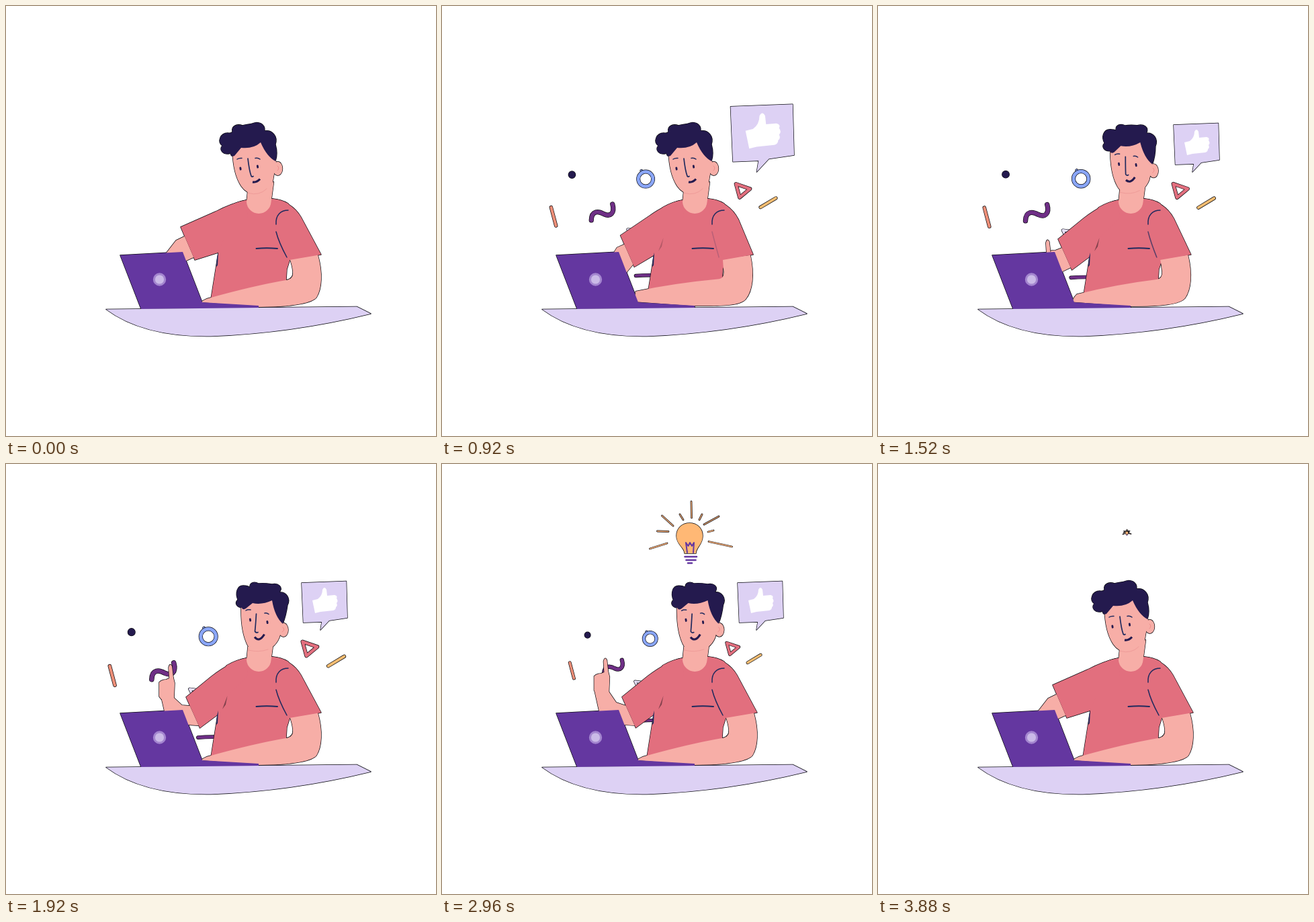
An HTML page with a canvas that plays this animation: 640x640 px, repeating every 3.92 s.

```html
<!DOCTYPE html>
<html lang="en">
<head>
<meta charset="utf-8">
<title>Bright idea at the desk</title>
<style>
  html, body { margin: 0; width: 100%; height: 100%; overflow: hidden; background: #fff; }
  canvas { display: block; width: 640px; height: 640px; }
</style>
</head>
<body>
<canvas id="stage" width="640" height="640"></canvas>
<script>
const ctx = document.getElementById('stage').getContext('2d');
const LOOP = 3920, STEP = 40;
const NAVY = '#241a4e', INK = '#202a5e', SKIN = '#f7aea7', SHIRT = '#e26f7e';
const PURPLE = '#6437a0', LILAC = '#ddd1f4', ORANGE = '#ffb875', EDGE = '#0a0a10';
const EDGE_WIDTH = 1.4;
let zoom = 1;

const clamp = x => Math.min(1, Math.max(0, x));
const smooth = x => { x = clamp(x); return x * x * (3 - 2 * x); };
const lerp = (a, b, u) => a + (b - a) * u;

// Blends two SVG paths that share the same commands.
function morph(a, b, u) {
  const target = b.match(/-?[\d.]+/g);
  let i = 0;
  return a.replace(/-?[\d.]+/g, n => lerp(+n, +target[i++], u).toFixed(2));
}

// Keyframes [time, ...values], joined by curves that rest at every extreme.
function track(keys) {
  const slope = (i, c) => {
    const p = keys[i - 1], k = keys[i], n = keys[i + 1];
    if (!p || !n || (k[c] - p[c]) * (n[c] - k[c]) <= 0) return 0;
    const s1 = (k[c] - p[c]) / (k[0] - p[0]), s2 = (n[c] - k[c]) / (n[0] - k[0]);
    return 2 * s1 * s2 / (s1 + s2);
  };
  return t => {
    const last = keys.length - 1;
    if (t <= keys[0][0]) return keys[0].slice(1);
    if (t >= keys[last][0]) return keys[last].slice(1);
    const i = keys.findIndex(k => k[0] > t) - 1;
    const a = keys[i], b = keys[i + 1], d = b[0] - a[0], u = (t - a[0]) / d;
    return a.slice(1).map((v, j) => {
      const c = j + 1;
      return lerp(v, b[c], smooth(u)) + d * u * (1 - u) *
        ((1 - u) * slope(i, c) - u * slope(i + 1, c));
    });
  };
}

const headTurn = track([[1080, 0], [1800, 1], [2880, 1], [3660, 0]]);
const sleeveDrop = track([[350, 0], [1250, 1], [2900, 1], [3800, 0]]);
const restShift = track([[100, 0], [1200, 1], [1800, 0]]);
const burst = track([[80, 0], [590, 1.02], [1180, 0.84], [1760, 0.99],
  [2240, 0.85], [2780, 0.99], [3380, 0]]);
// Inner elbow, right wrist, left wrist, outer elbow.
const forearm = track([
  [0, 253, 349, 239, 367, 215, 395, 262, 382],
  [640, 255, 352, 246, 366, 222, 395, 264, 389],
  [1200, 265, 366, 262, 370, 255, 405, 276, 412],
  [1920, 262, 359, 250, 348, 231, 347, 240, 386],
  [2400, 260, 356, 246, 320, 224, 321, 236, 386],
  [2700, 260, 356, 246, 320, 224, 321, 236, 386],
  [3360, 257, 352, 253, 375, 232, 375, 245, 386],
  [3840, 253, 349, 239, 367, 215, 395, 262, 382]
]);
// How far the pointing hand is tucked behind the screen.
const handTuck = track([[1200, 75], [1800, 0], [3360, 0], [3760, 75]]);

// Grows past full size, then settles.
function pop(t, start) {
  const e = t - start;
  if (e < 360) return 1.44 * smooth(e / 360);
  return 1 + 0.44 * (1 - Math.pow(clamp((e - 360) / 230), 1.5));
}
const shrink = (t, end) => clamp((end - t) / 400);

function fill(path, color) {
  ctx.fillStyle = color;
  ctx.fill(new Path2D(path));
}
function line(path, color, width) {
  ctx.strokeStyle = color;
  ctx.lineWidth = width;
  ctx.stroke(new Path2D(path));
}
function edge(path, width = 0) {
  line(path, EDGE, width + EDGE_WIDTH / zoom);
}
function shape(path, color) {
  edge(path);
  fill(path, color);
}
function tube(path, color, width) {
  edge(path, width);
  line(path, color, width);
}
// Outlines a whole set first so only its joint silhouette shows an edge.
function group(parts) {
  parts.forEach(p => edge(p[0]));
  parts.forEach(p => fill(...p));
}
const disc = (x, y, rx, ry = rx) =>
  `M${x - rx} ${y} a${rx} ${ry} 0 1 0 ${2 * rx} 0 a${rx} ${ry} 0 1 0 ${-2 * rx} 0 Z`;

function scaled(x, y, s, draw) {
  if (s < 0.012) return;
  ctx.save();
  ctx.translate(x, y);
  ctx.scale(s, s);
  ctx.translate(-x, -y);
  zoom = s;
  draw();
  zoom = 1;
  ctx.restore();
}

function confetti() {
  const ring = disc(299, 256, 12);
  shape(disc(179, 249, 5.6), NAVY);
  tube('M292 242.500 L294 246', '#8aa6f8', 3.5);
  tube(ring, '#8aa6f8', 5);
  tube('M446 264 L469 272 L452 286 Z', SHIRT, 4.6);
  tube('M486 302 L511 287', '#f3bd72', 4.2);
  tube('M145 302 L153 332', '#ee8f78', 4.4);
  tube('M210.500 323 C211 307 222 308 231 313 C242 318 249 311 245 297', '#6f2f86', 6.4);
  tube('M283 413.500 Q300 412 325 413', '#6f2f86', 4.6);
  tube('M270 338 L294 341 L279 356 Z', '#e6dff7', 3.6);
}

function bubble() {
  shape('M440 177 L506.500 174.500 L508 229 L481 233 L468 247 L470 235 L442.500 236 Z', LILAC);
  fill('M456 203 L464 201 Q471 196 471 187 Q474 181 477 187 L478 196 L489 195 ' +
    'Q494 196 492 200 Q495 204 492 207 Q494 211 491 213 Q491 217 487 218 L468 220 L460 222 Z', '#fff');
}

function bulb() {
  ['M371 56 L371.500 80', 'M327.500 77 L344 92', 'M354 75 L359 83', 'M387 75 L383 83',
    'M412 78 L390 90', 'M320.500 100 L337 100.500', 'M309.500 126 L335 118',
    'M396 101 L404 99', 'M397 115.500 L431.500 123'].forEach(r => tube(r, '#f9b078', 1.4));
  shape('M361 133 C361 124 349 120 349 107 C349 95 358 88 368.500 88 ' +
    'C379 88 388 95 388 107 C388 120 378 124 378 133 Z', ORANGE);
  line('M365 132 L363 117 L366.500 122 L369 117 L372 122 L375 117 L374 132', PURPLE, 2);
  line('M361.500 138 L379 138 M363.500 143 L377.500 143 M366 147.500 L372 147.500', PURPLE, 2.6);
}

function bodyParts(t) {
  const [drop] = sleeveDrop(t), [shift] = restShift(t), [tuck] = handTuck(t);
  const [ix, iy, rx, ry, lx, ly, ox, oy] = forearm(t);
  const c1 = [lerp(260, 268, drop), lerp(329, 347, drop)];
  const c2 = [lerp(281, 288.5, drop), lerp(378, 393, drop)];
  const cuff = u => `${lerp(c1[0], c2[0], u)} ${lerp(c1[1], c2[1], u)}`;
  const lower = `M${cuff(0.28)} L${ix} ${iy} L${rx} ${ry} L${lx} ${ly} L${ox} ${oy} L${cuff(0.92)} Z`;
  const fist = `M${rx - 19} ${ry + tuck + 2} l-3 -4 l0 -21 q4 -4 10 -4 l5 -2 l-1 -16 q2 -8 5 -2 l2 17 l2 8 l-1 24 Z`;
  const sleeve = `M357 289 Q335 294 ${lerp(312, 306, drop)} ${lerp(306, 316, drop)} L${cuff(0)} L${cuff(1)} ` +
    `L${lerp(316, 318, drop)} ${lerp(367, 371, drop)} L${lerp(325, 330, drop)} 345 L360 315 Z`;
  const torso = 'M358 289 C345 291 335 296 328 300 L318 325 L316 367 L305 436 L417 436 ' +
    'L417 408 L418 392 L423 376 L442 330 L420 294 Q410 288 396 287 Z';
  const farSleeve = morph(
    'M396 287 Q425 291 439 314 L469 370 L422 378 L402 338 Z',
    'M396 287 Q428 291 442 319 L462 370 L417 378 L402 338 Z', shift);
  const restArm = morph(
    'M464 370 C472 398 470 421 462 434 C455 442 430 446 400 447.5 L376 448 L291 441 ' +
    'Q293 437 305 434 Q370 416 417 408 Q428 406 427 396 Q426 385 422 376 Z',
    'M458 371 C464 400 461 425 450 437 C443 445 425 446 400 446 L370 446 L288 440 ' +
    'Q285 434 285 423 Q340 412 412 406 Q418 405 418 396 Q417 385 417 376 Z', shift);
  return [[lower, SKIN], [fist, SKIN], [torso, SHIRT], [sleeve, SHIRT], [restArm, SKIN], [farSleeve, SHIRT]];
}

function bodyLines(t) {
  const [drop] = sleeveDrop(t), [shift] = restShift(t);
  fill('M316 367 L315 386 L313 388 L314 374 Z', INK);
  ctx.globalAlpha = drop * drop;
  fill('M329.500 345 L327 358 L322 365 Z', '#80404c');
  ctx.globalAlpha = 1;
  line('M402 325 C401 311 409 304 420 304', INK, 1.5);
  line('M372.500 361 Q388 359.500 404 361', INK, 1.9);
  ctx.globalAlpha = clamp(1.3 * (1 - shift));
  line(`M402 336 Q406 352 ${lerp(418, 411, shift)} 374`, INK, 1.5);
  ctx.globalAlpha = 1;
}

function headParts(t) {
  const [turn] = headTurn(t);
  const neck = 'M360 272 L358 292 A18.300 18.300 0 0 0 394.500 292 L398.500 262 Z';
  const ear = disc(lerp(404.5, 413, turn), lerp(242, 247, turn), 7, 10.2);
  const face = morph(
    'M337 215 Q338 250 350 268 Q358 280 372 280 Q390 280 397 262 L402 232 L390 195 L350 200 Z',
    'M350 210 Q349 244 357 264 Q362 279 376 279 Q399 278 407 258 L413 236 L400 195 L360 200 Z', turn);
  const hair = morph(
    'M322 208 C314 202 319 189 330 189 Q336 190 337 187 C335 178 345 175 352 178 ' +
    'C358 176 365 176 367 175 C375 171 386 175 385 186 C396 184 405 194 401 206 Q405 220 401 231 ' +
    'Q388 224 379 203 Q368 213 350 211 L340 223 Q335 225 334 219 C324 223 316 214 322 208 Z',
    'M345 202 C341 192 344 181 353 181 Q360 181 363 184 C362 177 369 174 376 178 ' +
    'C383 177 390 178 396 179 C405 177 413 183 407 191 C417 190 424 200 419 210 Q417 225 412 238 ' +
    'Q400 227 396 203 Q381 210 367 207 L357 215 Q352 218 351 214 C343 213 340 207 345 202 Z', turn);
  return [[neck, SKIN], [ear, SKIN], [face, SKIN], [hair, NAVY]];
}

function headLines(t) {
  const [turn] = headTurn(t);
  const stroke = (a, b, color, width) => line(morph(a, b, turn), color, width);
  const closed = t >= 2480 && t < 2640;
  stroke('M404 238 Q408 241 404 245', 'M412 243 Q416 247 411 250', '#ee8d8d', 1);
  stroke('M361 278.5 Q377 283 388 272', 'M361 277 Q376 281 390 276', '#ef9c99', 1);
  const eyes = [[349, 242, 363.5, 232], [374.5, 239, 389, 235.5]];
  for (const [x1, y1, x2, y2] of eyes) {
    const x = lerp(x1, x2, turn), y = lerp(y1, y2, turn);
    if (closed) line(`M${x - 1.5} ${y} l3 0`, '#9d6673', 1);
    else line(`M${x - 0.2} ${y - 1.2} l0.4 2.4`, NAVY, 2.8);
  }
  stroke('M344 228 Q347 226 351 226.5 M371 226.5 Q375 225.5 378 228',
    'M357 218 Q360 216 364 217 M385 222 Q388 221 391 223.5', INK, 1.5);
  stroke('M360 227 Q362 245 365 253 Q366 255 368 253.5',
    'M372.5 223 Q371.5 240 370.5 249 Q372 252 375 250.5', INK, 1.7);
  ctx.lineCap = 'butt';
  stroke('M367 262 Q373 263 378 257.5', 'M370 257.5 Q377 266 384.5 253.5', NAVY, 3.1);
  ctx.lineCap = 'round';
}

const deskParts = [
  ['M170 371 L263 366 L292 441 L376 446 L376 450 L201 451 Z', PURPLE],
  ['M149 451.500 L522 447.500 L543 458 Q425 487 305 491.500 Q205 493 149 451.500 Z', LILAC]
];

function draw(t) {
  ctx.fillStyle = '#fff';
  ctx.fillRect(0, 0, 640, 640);
  ctx.lineCap = ctx.lineJoin = 'round';
  scaled(347, 274, burst(t)[0], confetti);
  scaled(467, 247, pop(t, 600) * shrink(t, 3476), bubble);
  const leaving = shrink(t, LOOP);
  scaled(370.5, leaving < 1 ? 102 : 152, pop(t, 2000) * leaving, bulb);
  group([...bodyParts(t), ...headParts(t), ...deskParts]);
  fill(disc(228.5, 407, 9.7), '#a385cf');
  fill(disc(228.5, 407, 6.6), '#cabae7');
  bodyLines(t);
  headLines(t);
}

const start = performance.now();
function frame() {
  const t = (performance.now() - start) % LOOP;
  draw(Math.floor(t / STEP) * STEP);
  requestAnimationFrame(frame);
}
frame();
</script>
</body>
</html>
```
